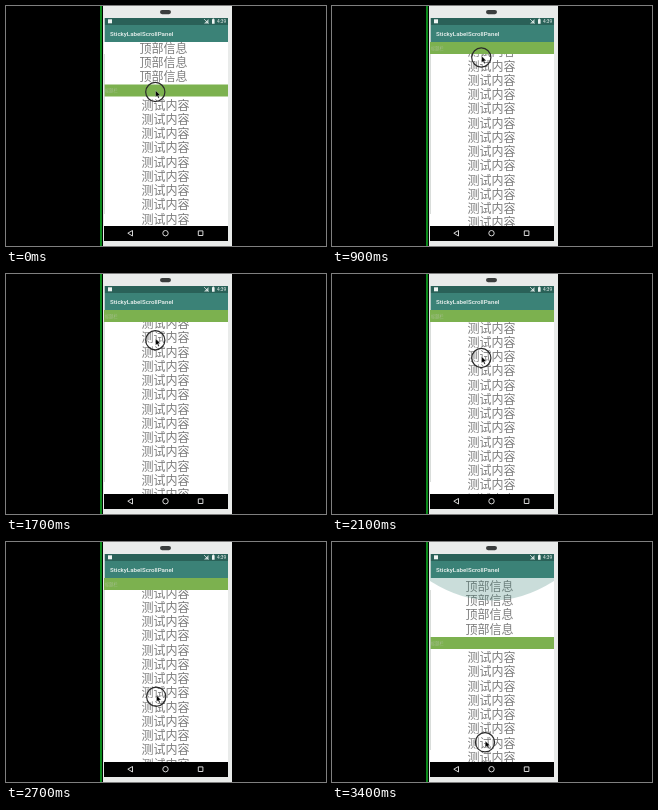
An HTML page that plays this animation: 320x240 px, repeating every 3500 ms.

```html
<!DOCTYPE html>
<html lang="zh-CN">
<head>
<meta charset="utf-8">
<style>
html, body { margin: 0; width: 100%; height: 100%; overflow: hidden; background: #000; }
svg { display: block; width: 320px; height: 240px; }
text { font-family: Roboto, "Noto Sans", sans-serif; }
.row, .label { font-family: "Noto Sans CJK SC", "Noto Sans CJK", sans-serif; }
.row { font-size: 12px; fill: #7c7c7c; text-anchor: middle; }
</style>
</head>
<body>
<svg viewBox="0 0 320 240">
  <defs>
    <clipPath id="view"><path d="M98 36H222V220H98z"/></clipPath>
  </defs>

  <!-- phone body -->
  <path fill="#e9ebea" d="M97 0H226V240H97z"/>
  <path fill="#0c8a1c" d="M94 0h2V240h-2z"/>
  <rect x="154" y="4" width="11" height="4.2" rx="2.1" fill="#3a3d3d"/>
  <path fill="#fff" d="M98 36H222V220H98z"/>

  <g clip-path="url(#view)">
    <g id="list"></g>
    <path id="glow" fill="#3b8277"/>
    <g id="bar">
      <path fill="#7cb14f" d="M98 0H222V12H98z"/>
      <text class="label" x="99" y="7.6" font-size="4.2" fill="#a3bd8c">标题栏</text>
    </g>
  </g>

  <!-- status and title bars -->
  <path fill="#2a6158" d="M98 12H222V19H98z"/>
  <path fill="#3b8277" d="M98 19H222V36H98z"/>
  <path fill="#d5dedb" d="M98 12h.8V36h-.8z"/>
  <path fill="#c9cecb" d="M98 48h.7V208h-.7z"/>
  <g fill="#eef4f2">
    <path d="M102 13.3h4v4h-4z"/>
    <path d="M202.5 13v4.5H198z" opacity=".75"/>
    <path d="M198 13l4.5 4.5" stroke="#eef4f2" stroke-width=".7"/>
    <path d="M206 13.2h.7v-.6h1.2v.6h.7v4.5H206z"/>
    <text x="211" y="17.3" font-size="4.8">4:39</text>
    <text x="104" y="30" font-size="6.2" font-weight="500">StickyLabelScrollPanel</text>
  </g>

  <!-- navigation bar -->
  <path d="M98 220H222V235H98z"/>
  <g fill="none" stroke="#eee" stroke-width=".9">
    <path d="M126.5 224.5V230L121.8 227.2z"/>
    <circle cx="159.5" cy="227.2" r="2.7"/>
    <path d="M192.3 224.9h4.6v4.6h-4.6z"/>
  </g>

  <g id="cursor">
    <circle r="9.6" fill="none" stroke="#2a2a2a" stroke-width="1.2"/>
    <path d="M.3-1.4V5L1.9 3.7 3 6.2 4 5.7 3 3.3H5z" stroke="#fff" stroke-width=".3"/>
  </g>
</svg>
<script>
const LOOP = 3500, STEP = 100, PITCH = 14.25, TOP = 95;
const PIN = 36, SLACK = 3; // the bar may slip a little past its resting place before it sticks
const get = id => document.getElementById(id);
const list = get('list'), bar = get('bar'), cursor = get('cursor'), glow = get('glow');

// time, value
const pointerX = [[0, 149.3], [2100, 149.3], [2700, 150.2], [3400, 153]];
const pointerY = [[0, 86], [500, 67.5], [900, 51.5], [1300, 48.5], [2100, 84], [2700, 154.7], [3400, 200.3]];
const scroll = [[0, 78.5], [500, 34.5], [900, -74.5], [1300, -75], [2100, -37.75], [2700, 30.5], [3200, TOP]];

function at(keys, t) {
  const i = keys.findIndex(k => k[0] > t);
  if (i < 0) return keys[keys.length - 1][1];
  const [t0, a] = keys[i - 1], [t1, b] = keys[i];
  return a + (b - a) * (t - t0) / (t1 - t0);
}

function addRow(label, x, center) {
  const row = document.createElementNS('http://www.w3.org/2000/svg', 'text');
  row.setAttribute('class', 'row');
  row.setAttribute('x', x);
  row.setAttribute('y', center + 4.5);
  row.textContent = label;
  list.append(row);
}
for (let i = 0; i < 4; i++) addRow('顶部信息', 157.6, -8 - i * PITCH);
for (let i = 0; i < 24; i++) addRow('测试内容', 159.4, 20.5 + i * PITCH);

const move = (el, x, y) => el.setAttribute('transform', `translate(${x} ${y})`);

function draw(now) {
  const t = Math.floor(now % LOOP / STEP) * STEP;
  const y = at(scroll, t);
  move(list, 0, y);
  move(bar, 0, y > PIN - SLACK ? y : PIN);
  move(cursor, at(pointerX, t), at(pointerY, t));

  const pull = Math.max(0, Math.min(1, (t - 3100) / 300));
  const edge = PIN + 3 * pull;
  glow.setAttribute('d', `M98 ${PIN}V${edge}Q160 ${edge + 39 * pull} 222 ${edge}V${PIN}z`);
  glow.setAttribute('opacity', .27 * pull);
  requestAnimationFrame(draw);
}
draw(performance.now());
</script>
</body>
</html>
```
